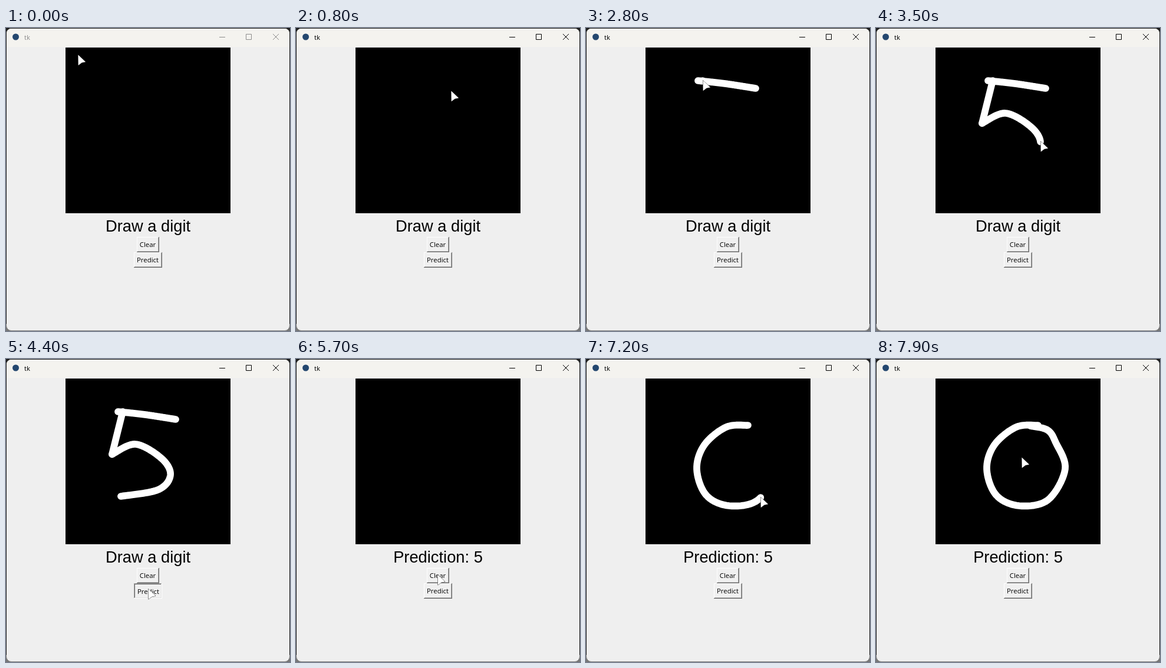
Write an HTML page with a canvas that moves like this. It is 482 px wide and 512 px high and loops after 8 s.

```html
<!DOCTYPE html>
<html lang="en">
<head>
<meta charset="utf-8">
<title>tk</title>
<style>
html, body { margin: 0; width: 100%; height: 100%; overflow: hidden; background: #222; }
canvas { display: block; }
</style>
</head>
<body>
<canvas id="stage" width="482" height="512"></canvas>
<script>
const ctx = document.getElementById('stage').getContext('2d');
const LOOP = 8000, TICK = 100;
const UI_FONT = '500 11.4px "Open Sans", "Noto Sans", sans-serif';
const LABEL_FONT = '27.3px "Liberation Sans", Arial, sans-serif';
const ACTIVE_AT = 300, PREDICT_DOWN = 4400, PREDICT_UP = 4500;
const CLEAR_DOWN = 5600, CLEAR_UP = 5700;

// The pointer's journey: free moves start where the last leg ended, pen legs leave ink
const legs = [];
const pen = (start, end, ...pts) => legs.push({ start, end, pts, ink: true });
const move = (start, end, ...pts) => {
  const prev = legs.length ? [legs[legs.length - 1].pts.at(-1)] : [];
  legs.push({ start, end, pts: [...prev, ...pts], ink: false });
};

move(0, 900, [122, 46], [266, 108]);
move(900, 1300, [183, 94], [190, 89]);
pen(1700, 2100, [190, 89], [236, 94], [288, 102]);
move(2400, 2600, [238, 102]);
pen(2800, 3100, [198, 89], [180, 161]);
pen(3100, 3800, [180, 161], [220, 144], [264, 168], [279, 196], [258, 221], [195, 232]);
move(3800, 4300, [241, 389]);
move(5000, 5300, [240, 365]);
move(5700, 6600, [273, 112]);
pen(6760, 7480, [275, 112], [238, 115], [201, 145], [188, 186], [204, 230], [243, 248],
  [292, 238], [321, 186], [305, 141], [291, 120], [262, 113]);
move(7480, 7900, [247, 167]);

const clamp = (v, lo, hi) => Math.max(lo, Math.min(hi, v));
const smooth = u => u * u * (3 - 2 * u);

// Catmull-Rom curve through pts, u from 0 to 1
function along(pts, u) {
  const last = pts.length - 1, k = u * last;
  const i = Math.min(Math.floor(k), last - 1), f = k - i;
  const p = n => pts[clamp(n, 0, last)];
  return [0, 1].map(c => {
    const a = p(i - 1)[c], b = p(i)[c], d = p(i + 1)[c], e = p(i + 2)[c];
    return b + 0.5 * f * (d - a + f * (2 * a - 5 * b + 4 * d - e + f * (3 * (b - d) + e - a)));
  });
}

const progress = (leg, t) => clamp((t - leg.start) / (leg.end - leg.start), 0, 1);

function pointer(t) {
  const leg = legs.findLast(leg => leg.start <= t);
  const u = progress(leg, t);
  return along(leg.pts, leg.ink ? u : smooth(u));
}

function rect(color, x, y, w, h) {
  ctx.fillStyle = color;
  ctx.fillRect(x, y, w, h);
}

function text(str, x, y, font, color = '#000', align = 'center') {
  ctx.font = font;
  ctx.fillStyle = color;
  ctx.textAlign = align;
  ctx.fillText(str, x, y);
}

function line(...pts) {
  ctx.beginPath();
  for (const [x, y] of pts) ctx.lineTo(x, y);
  ctx.stroke();
}

function drawWindow(active) {
  rect('#1c1c1c', 0, 0, 482, 512);
  rect('#777', 0, 500, 482, 12);
  ctx.save();
  ctx.beginPath();
  ctx.roundRect(1, 1, 480, 510, 8);
  ctx.clip();
  rect('#efefef', 1, 1, 480, 510);
  rect('#f4f3ef', 1, 1, 480, 31);
  ctx.restore();

  ctx.fillStyle = '#24476f';
  ctx.beginPath();
  ctx.arc(16.5, 15, 5.5, 0, 7);
  ctx.fill();

  const ink = active ? '#000' : '#8c8c8c';
  text('tk', 31, 20, UI_FONT, ink, 'left');
  ctx.strokeStyle = ink;
  ctx.lineWidth = 1;
  line([362, 15.5], [372, 15.5]);
  ctx.strokeRect(407.5, 10.5, 9, 9);
  line([453, 10], [463, 20]);
  line([463, 10], [453, 20]);
}

function drawButton(label, x, y, w, h, down) {
  const [outerTop, outerLow, innerTop, innerLow] = down
    ? ['#a0a0a0', '#fff', '#696969', '#e3e3e3']
    : ['#fff', '#696969', '#efefef', '#a0a0a0'];
  rect(outerLow, x, y, w, h);
  rect(outerTop, x, y, w - 1, h - 1);
  rect(innerLow, x + 1, y + 1, w - 2, h - 2);
  rect(innerTop, x + 1, y + 1, w - 3, h - 3);
  rect('#f0f0f0', x + 2, y + 2, w - 4, h - 4);
  const shift = down ? 1 : 0;
  text(label, x + w / 2 - 0.5 + shift, y + 17 + shift, UI_FONT);
}

function drawInk(t) {
  ctx.strokeStyle = '#fff';
  ctx.lineWidth = 11.7;
  ctx.lineCap = ctx.lineJoin = 'round';
  for (const leg of legs) {
    const erased = leg.start < CLEAR_UP && t >= CLEAR_UP;
    if (!leg.ink || t < leg.start || erased) continue;
    const end = progress(leg, t), path = [leg.pts[0]];
    for (let u = 0; u < end; u += 0.01) path.push(along(leg.pts, u));
    path.push(along(leg.pts, end));
    line(...path);
  }
  ctx.lineCap = 'butt';
}

function drawPointer([x, y]) {
  ctx.save();
  ctx.translate(Math.round(x) + 0.5, Math.round(y) - 0.5);
  ctx.beginPath();
  ctx.moveTo(0, 0);
  ctx.lineTo(12.5, 11.8);
  ctx.lineTo(6.2, 13);
  ctx.lineTo(0.3, 17.5);
  ctx.closePath();
  ctx.fillStyle = '#fff';
  ctx.strokeStyle = '#2c2c2c';
  ctx.lineWidth = 1;
  ctx.lineJoin = 'round';
  ctx.stroke();
  ctx.fill();
  ctx.restore();
}

function draw(t) {
  drawWindow(t >= ACTIVE_AT);
  rect('#000', 101, 33, 280, 280);
  drawInk(t);
  text(t < PREDICT_UP ? 'Draw a digit' : 'Prediction: 5', 241, 344, LABEL_FONT);
  drawButton('Clear', 222, 353, 38, 26, t >= CLEAR_DOWN && t < CLEAR_UP);
  drawButton('Predict', 217, 379, 48, 26, t >= PREDICT_DOWN && t < PREDICT_UP);
  drawPointer(pointer(t));
}

const begin = performance.now();
function frame() {
  const t = (performance.now() - begin) % LOOP;
  draw(Math.floor(t / TICK) * TICK);
  requestAnimationFrame(frame);
}
frame();
</script>
</body>
</html>
```
